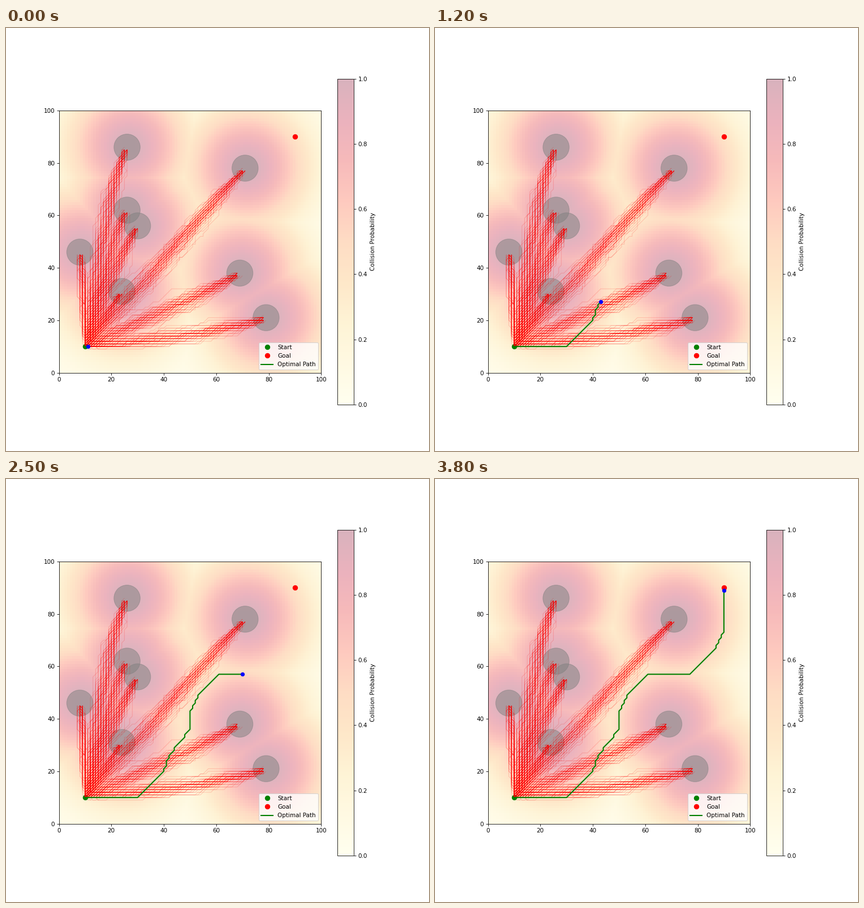
These frames come from a looping animation (748x748 px, 3900 ms). A matplotlib script:

```python
import numpy as np
import matplotlib.pyplot as plt
from matplotlib.animation import FuncAnimation
from matplotlib.collections import LineCollection

FRAMES, INTERVAL = 39, 100
START, GOAL = (10, 10), (90, 90)
OBSTACLES = [(26, 86), (71, 78), (26, 62), (30, 56),
             (8, 46), (24, 31), (69, 38), (79, 21)]
RADIUS, SPREAD = 5, 16.5
WALKS, NOISE = 65, 0.27
STRIDE = 3
TURNS = [START, (30, 10), (40, 20), (42, 26), (50, 36), (50, 42),
         (53, 49), (61, 57), (77, 57), (87, 67), (90, 74), GOAL]

rng = np.random.default_rng(4)


def grid_path(turns):
    """Join the turns by straight runs rounded to grid cells."""
    runs = [np.array(turns[:1])]
    for a, b in zip(turns, turns[1:]):
        steps = np.abs(np.subtract(b, a)).max()
        runs.append(np.rint(np.linspace(a, b, steps + 1)[1:]))
    return np.concatenate(runs)


def noisy_walk(target):
    """Walk on the grid towards the target with a disturbed heading."""
    cells = [np.array(START)]
    for _ in range(400):
        gap = target - cells[-1]
        dist = np.hypot(*gap)
        if dist < 1.5:
            break
        move = np.rint(gap / dist + rng.normal(0, NOISE, 2))
        cells.append(cells[-1] + np.clip(move, -1, 1))
    return np.array(cells)


def collision_map(size=100):
    y, x = np.mgrid[:size, :size]
    return np.max([np.exp(-((x - cx) ** 2 + (y - cy) ** 2) / (2 * SPREAD ** 2))
                   for cx, cy in OBSTACLES], axis=0)


fig, ax = plt.subplots(figsize=(10, 10), dpi=74.8)
heat = ax.imshow(collision_map(), cmap="YlOrRd", alpha=0.3, vmin=0, vmax=1,
                 origin="lower", extent=(0, 100, 0, 100))
bar = fig.colorbar(heat, ax=ax)
bar.set_label("Collision Probability", labelpad=5)

for center in OBSTACLES:
    ax.add_patch(plt.Circle(center, RADIUS, color="gray", alpha=0.5))

ax.plot(*START, "go", markersize=8, label="Start")
ax.plot(*GOAL, "ro", markersize=8, label="Goal")

walks = [noisy_walk(np.array(target))
         for target in OBSTACLES for _ in range(WALKS)]
ax.add_collection(LineCollection(walks, colors="red", alpha=0.16,
                                 linewidths=1, zorder=2))

route = grid_path(TURNS)
trail, = ax.plot([], [], color="green", linewidth=2, label="Optimal Path")
robot, = ax.plot([], [], "bo")

ax.set_xlim(0, 100)
ax.set_ylim(0, 100)
ax.legend(loc="lower right")


def update(frame):
    last = 1 + STRIDE * frame
    trail.set_data(*route[:last + 1].T)
    robot.set_data(*route[last:last + 1].T)
    return trail, robot


anim = FuncAnimation(fig, update, frames=FRAMES, interval=INTERVAL,
                     repeat=True, repeat_delay=0)
plt.show()
```
